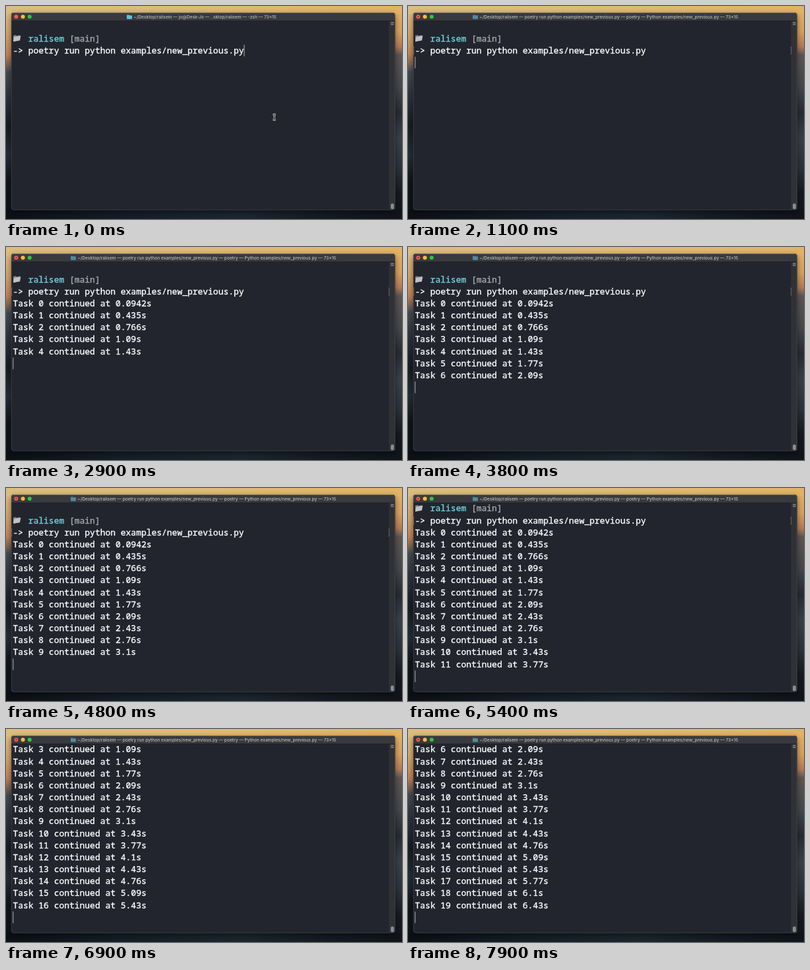
Animation, 600 px wide and 323 px high, one loop 8 s. Source, as an HTML page with a canvas:

```html
<!DOCTYPE html>
<html lang="en">
<head>
<meta charset="utf-8">
<title>Terminal</title>
<style>
html, body { margin: 0; width: 100%; height: 100%; overflow: hidden; background: #161b22; }
canvas { display: block; width: 600px; height: 323px; }
</style>
</head>
<body>
<canvas id="stage"></canvas>
<script>
const W = 600, H = 323, LOOP = 8000;
const ROWS = 15, PITCH = 18.17, LEFT = 10.4, CELL = 7.78;
const ENTER = 600;        // the command is sent
const SCRIPT = 1420;      // the script's own clock starts
const MONO = '12.97px "Noto Sans Mono", monospace';
const SANS = '500 6.58px Inter, sans-serif';
const COMMAND = 'poetry run python examples/new_previous.py';
const IDLE_TITLE = '~/Desktop/ralisem — jo@Desk-Jo — ..sktop/ralisem — -zsh — 73×15';
const BUSY_TITLE = '~/Desktop/ralisem — ' + COMMAND +
  ' — poetry — Python examples/new_previous.py — 73×15';
const TIMES = ['0.0942', '0.435', '0.766', '1.09', '1.43', '1.77', '2.09', '2.43', '2.76', '3.1',
  '3.43', '3.77', '4.1', '4.43', '4.76', '5.09', '5.43', '5.77', '6.1', '6.43'];

const canvas = document.getElementById('stage');
const ctx = canvas.getContext('2d');
const dpr = window.devicePixelRatio || 1;
canvas.width = W * dpr;
canvas.height = H * dpr;

function rect(x, y, w, h, fill) {
  ctx.fillStyle = fill;
  ctx.fillRect(x, y, w, h);
}

function round(x, y, w, h, r, fill) {
  ctx.fillStyle = fill;
  ctx.beginPath();
  ctx.roundRect(x, y, w, h, r);
  ctx.fill();
}

function disc(x, y, r, fill) {
  ctx.fillStyle = fill;
  ctx.beginPath();
  ctx.arc(x, y, r, 0, Math.PI * 2);
  ctx.fill();
}

function shape(points, fill) {
  ctx.fillStyle = fill;
  ctx.beginPath();
  points.forEach(([x, y]) => ctx.lineTo(x, y));
  ctx.fill();
}

function gradient(x, y, stops) {
  const g = ctx.createLinearGradient(0, 0, x, y);
  stops.forEach(([at, color]) => g.addColorStop(at, color));
  return g;
}

function text(str, x, y, font, color, weight = 0) {
  ctx.font = font;
  ctx.fillStyle = ctx.strokeStyle = color;
  ctx.fillText(str, x, y);
  if (weight) {
    ctx.lineWidth = weight;
    ctx.lineJoin = 'round';
    ctx.strokeText(str, x, y);
  }
}

const baseline = row => 35.4 + row * PITCH;
const print = (str, col, row, color = '#fff') =>
  text(str, LEFT + col * CELL, baseline(row), MONO, color, 0.35);

function drawDesktop() {
  rect(0, 0, 300, H, gradient(0, H, [[0, '#dfc083'], [0.13, '#d3a76a'], [0.23, '#c38253'],
    [0.28, '#75604f'], [0.31, '#434a50'], [0.43, '#2a323a'], [0.56, '#161c22'],
    [0.7, '#252d35'], [0.82, '#10151b'], [1, '#0d1218']]));
  rect(300, 0, 300, H, gradient(0, H, [[0, '#e2b668'], [0.12, '#d9a05c'], [0.19, '#b37c58'],
    [0.23, '#5d5553'], [0.38, '#45484d'], [0.5, '#262c33'], [0.62, '#39414a'],
    [0.76, '#2b323a'], [0.88, '#151a20'], [1, '#10151b']]));
  rect(0, 0, W, 12, gradient(W, 0, [[0, '#dcbd80'], [0.5, '#dfbb75'], [1, '#e2b364']]));
  rect(0, 309, W, 14, gradient(W, 0, [[0, '#0b1016'], [0.3, '#151e27'], [0.6, '#1c262f'],
    [0.8, '#141b23'], [1, '#0f141a']]));
}

function drawWindow() {
  ctx.save();
  ctx.shadowColor = 'rgba(0,0,0,.5)';
  ctx.shadowBlur = 8 * dpr;
  ctx.shadowOffsetY = 3 * dpr;
  round(8, 10, 581.5, 299.5, 4, '#22252e');
  ctx.restore();
  round(8, 10, 581.5, 12.5, [4, 4, 0, 0], '#393a3d');
  rect(11, 10, 575, 0.6, '#6a6a6b');
  rect(8, 22, 581.5, 0.6, '#17191e');
  // scroll bar
  rect(581, 22.6, 8.5, 286, '#303135');
  rect(580.7, 22.6, 0.6, 286, '#3e4046');
  round(583, 24, 4.6, 5, 0.8, '#6c6f75');
  rect(583.7, 26.2, 3.2, 0.6, '#2a2d35');
  round(583, 299.5, 4.8, 8.5, 2, '#8b8d91');
  ctx.strokeStyle = 'rgba(140,145,155,.4)';
  ctx.lineWidth = 0.6;
  ctx.beginPath();
  ctx.roundRect(8.2, 10.2, 581, 299, 4);
  ctx.stroke();
}

function drawTitle(busy) {
  ['#fc5b57', '#fdbd2f', '#2ac840'].forEach((color, i) => disc(15.4 + i * 10.2, 16.3, 3, color));
  if (busy) disc(15.4, 16.3, 1, '#7a1512');
  const x = busy ? 98 : 183;
  round(x, 13.3, 4, 3, 0.6, busy ? '#3f6c80' : '#4aa3c4');
  round(x, 14.2, 8, 5.6, 0.7, busy ? '#55899e' : '#62c3e2');
  text(busy ? BUSY_TITLE : IDLE_TITLE, x + 10.5, 18.8, SANS, '#bcbdbf');
}

function drawFolder(row) {
  const y = baseline(row) - 10.6;
  shape([[11, y + 2], [15, y + 1], [16, y + 2.2], [21, y + 1.2], [21, y + 9], [11, y + 11]], '#85898d');
  shape([[12.2, y + 4], [22.4, y + 2], [21, y + 9.2], [11, y + 11]], '#c0c3c5');
}

function drawPointer(x, y) {
  const stroke = (color, width) => {
    ctx.strokeStyle = color;
    ctx.lineWidth = width;
    ctx.beginPath();
    ctx.moveTo(x - 2.2, y - 4.3);
    ctx.quadraticCurveTo(x, y - 4.3, x, y - 2.6);
    ctx.quadraticCurveTo(x, y - 4.3, x + 2.2, y - 4.3);
    ctx.moveTo(x, y - 3);
    ctx.lineTo(x, y + 3);
    ctx.moveTo(x - 2.2, y + 4.3);
    ctx.quadraticCurveTo(x, y + 4.3, x, y + 2.6);
    ctx.quadraticCurveTo(x, y + 4.3, x + 2.2, y + 4.3);
    ctx.moveTo(x - 1.2, y + 1.5);
    ctx.lineTo(x + 1.2, y + 1.5);
    ctx.stroke();
  };
  stroke('#d5d6d8', 2.6);
  stroke('#15171c', 0.9);
}

function drawMarks(row) {
  const y = baseline(row) - 9.6;
  ctx.strokeStyle = '#777a81';
  ctx.lineWidth = 0.7;
  [[9.8, -1.2], [579.2, 1.2]].forEach(([x, dir]) => {
    ctx.beginPath();
    ctx.moveTo(x, y);
    ctx.lineTo(x + dir, y);
    ctx.lineTo(x + dir, y + 11);
    ctx.lineTo(x, y + 11);
    ctx.stroke();
  });
}

function drawCursor(col, row) {
  rect(LEFT + col * CELL, baseline(row) - 13, 0.9, 17.6, '#bfc1c5');
}

function drawScreen(time) {
  const busy = time >= ENTER;
  const done = TIMES.filter(s => SCRIPT + s * 1000 <= time).length;
  const cursorRow = busy ? 3 + done : 2;
  const scroll = Math.max(0, cursorRow - ROWS + 1);
  const visible = (row, draw) => { if (row >= scroll) draw(row - scroll); };

  visible(1, row => {
    drawFolder(row);
    print('ralisem', 3, row, '#70d4df');
    print('[main]', 11, row, '#a8aaae');
  });
  visible(2, row => {
    print('->', 0, row);
    print(COMMAND, 3, row);
    if (busy) drawMarks(row);
  });
  TIMES.slice(0, done).forEach((s, i) =>
    visible(3 + i, row => print(`Task ${i} continued at ${s}s`, 0, row)));
  drawCursor(busy ? 0 : 3 + COMMAND.length, cursorRow - scroll);
  if (!busy) drawPointer(406.5, 168.5);
}

function draw(time) {
  ctx.setTransform(dpr, 0, 0, dpr, 0, 0);
  drawDesktop();
  drawWindow();
  drawTitle(time >= ENTER);
  drawScreen(time);
}

const start = performance.now();
function tick() {
  // the screen refreshes ten times a second
  const time = (performance.now() - start) % LOOP;
  draw(Math.floor(time / 100) * 100);
  requestAnimationFrame(tick);
}
tick();
</script>
</body>
</html>
```
